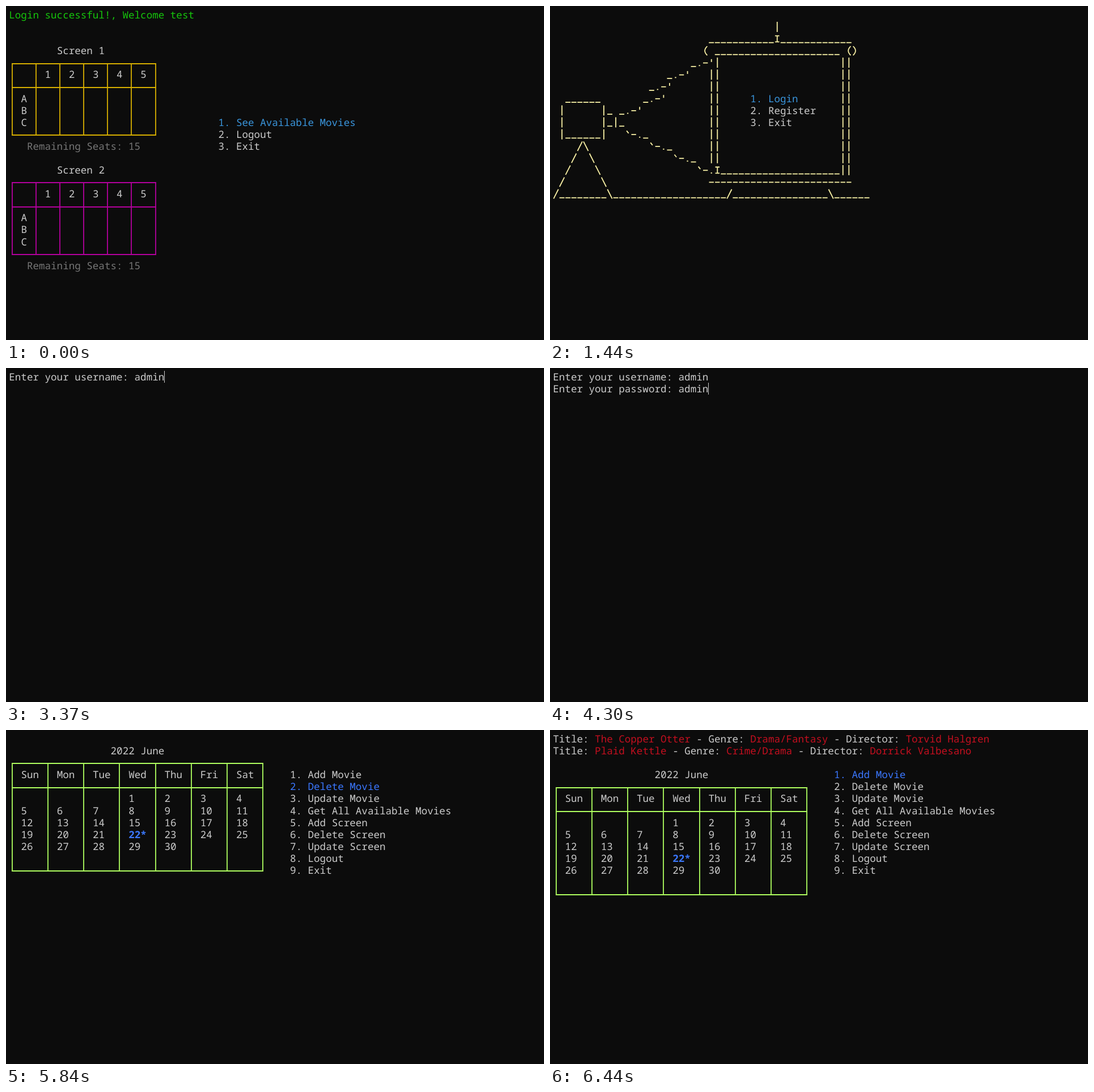
An HTML page for the animation above (8000 ms loop, 949 px wide and 590 px high).

```html
<!DOCTYPE html>
<html lang="en">
<head>
<meta charset="utf-8">
<title>Cinema console</title>
<style>
  html, body { margin: 0; width: 100%; height: 100%; overflow: hidden; background: #0c0c0c; }
  svg { display: block; width: 100%; height: 100%; }
  text {
    font: 17.575px "Noto Sans Mono", "DejaVu Sans Mono", monospace;
    font-variant-ligatures: none;
    text-rendering: geometricPrecision;
    white-space: pre;
  }
  .bold { font-weight: 700; }
  path { fill: none; }
</style>
</head>
<body>
<svg id="stage" viewBox="0 0 949 590" xmlns="http://www.w3.org/2000/svg"></svg>
<script>
const LOOP = 8000;
const CW = 10.545, CH = 21.08, LEFT = 5.3, TOP = 5.3;
const GREY = '#cccccc', DIM = '#767676', GREEN = '#16c60c', RED = '#c50f1f';
const CYAN = '#3a96dd', BLUE = '#3b78ff', CREAM = '#f9f1a5';
const GOLD = '#d7af00', MAGENTA = '#b4009e', LIME = '#afff5f';

const colX = c => LEFT + c * CW;
const midX = c => colX(c) + CW / 2;
const midY = r => TOP + (r + 0.5) * CH;

const text = (c, r, s, color = GREY, cls = '') =>
  `<text x="${colX(c)}" y="${midY(r) + 6.2}" fill="${color}" class="${cls}" xml:space="preserve">${s}</text>`;

const cursor = (c, r) =>
  `<rect x="${Math.round(colX(c))}" y="${Math.round(TOP + r * CH)}" width="1" height="21" fill="${GREY}"/>`;

// Consecutive coloured pieces on one row
function line(r, parts) {
  let c = 0;
  return parts.map(([s, color]) => {
    const out = text(c, r, s, color);
    c += s.length;
    return out;
  }).join('');
}

// Ruled box: n columns of the given width, horizontal rules at the given rows
function grid(rows, n, width, color) {
  const x = i => Math.round(midX(i * width));
  const y = rows.map(r => Math.round(midY(r) + 1.5));
  const top = y[0], bottom = y[y.length - 1];
  let d = y.map(v => `M${x(0) - 1} ${v}H${x(n) + 1}`).join('');
  for (let i = 0; i <= n; i++) d += `M${x(i)} ${top}V${bottom}`;
  return `<path d="${d}" stroke="${color}" stroke-width="1.8"/>`;
}

const menu = (c, r, items, picked, color) =>
  items.map((s, i) => text(c, r + i, `${i + 1}. ${s}`, i + 1 === picked ? color : GREY)).join('');

function hall(no, r, color) {
  let out = text(8, r, `Screen ${no}`) + grid([r + 1, r + 3, r + 7], 6, 4, color);
  for (let i = 1; i <= 5; i++) out += text(2 + 4 * i, r + 2, i);
  [...'ABC'].forEach((s, i) => out += text(2, r + 4 + i, s));
  return out + text(3, r + 8, 'Remaining Seats: 15', DIM);
}

const seats = (r, picked) =>
  hall(1, r, GOLD) + hall(2, r + 10, MAGENTA) +
  menu(35, 9, ['See Available Movies', 'Logout', 'Exit'], picked, CYAN);

function calendar(r) {
  let out = text(17, r, '2022 June') + grid([r + 1, r + 3, r + 10], 7, 6, LIME);
  ['Sun', 'Mon', 'Tue', 'Wed', 'Thu', 'Fri', 'Sat'].forEach((s, i) => out += text(2 + 6 * i, r + 2, s));
  for (let day = 1; day <= 30; day++) {
    const cell = day + 2, c = 2 + 6 * (cell % 7), row = r + 4 + Math.floor(cell / 7);
    out += day === 22 ? text(c, row, '22*', BLUE, 'bold') : text(c, row, day);
  }
  return out;
}

const ADMIN = ['Add Movie', 'Delete Movie', 'Update Movie', 'Get All Available Movies',
  'Add Screen', 'Delete Screen', 'Update Screen', 'Logout', 'Exit'];
const admin = (r, picked) => calendar(r) + menu(47, 3, ADMIN, picked, BLUE);

// Strokes for the line art, relative to the centre of a cell
const STROKES = {
  '_': 'M-4.5 6.7H4.5',
  '-': 'M-4.2 .4H4.2',
  '|': 'M0-9V9',
  '/': 'M-4.2 8.3L4.2-8.3',
  '\\': 'M-4.2-8.3L4.2 8.3',
  '.': 'M-1.2 5.1H1.2',
  "'": 'M0-6.3V-1.2',
  '`': 'M-2-6.3L1.6-1.8',
  '(': 'M3.2-8Q-5.4 0 3.2 8',
  ')': 'M-3.2-8Q5.4 0-3.2 8',
  'I': 'M-3.8-5.4H3.8M0-5.4V5.4M-3.8 5.4H3.8'
};

function art(c, r, s) {
  return [...s].map((ch, i) => STROKES[ch]
    ? `<path d="${STROKES[ch]}" transform="translate(${midX(c + i)} ${midY(r)})"/>` : '').join('');
}

function projector() {
  const u = n => '_'.repeat(n);
  let out = [
    [37, 1, '|'],
    [26, 2, u(11) + 'I' + u(12)],
    [25, 3, '( ' + u(21) + ' ()'],
    [23, 4, "_.-'|"], [19, 5, "_.-'"], [16, 6, "_.-'"],
    [2, 7, u(6)], [15, 7, "_.-'"],
    [1, 8, "|      |_ _.-'"],
    [1, 9, '|      |_|_'],
    [1, 10, '|' + u(6) + '|'], [12, 10, '`-._'],
    [16, 11, '`-._'], [20, 12, '`-._'],
    [24, 13, '`-.I' + u(20)],
    [26, 14, '-'.repeat(24)],
    [0, 15, '/' + u(8) + '\\' + u(19) + '/' + u(16) + '\\' + u(6)]
  ].map(a => art(...a)).join('');
  for (let r = 4; r <= 13; r++) out += art(48, r, '||');
  for (let r = 5; r <= 12; r++) out += art(26, r, '||');
  for (let i = 0; i < 4; i++) out += art(4 - i, 11 + i, '/') + art(5 + i, 11 + i, '\\');
  return `<g stroke="${CREAM}" stroke-width="1.8">${out}</g>` +
    menu(33, 7, ['Login', 'Register', 'Exit'], 1, CYAN);
}

const welcome = name => text(0, 0, `Login successful!, Welcome ${name}`, GREEN);

const NAME = 'admin';
const ask = (what, r, n) => text(0, r, `Enter your ${what}: ` + NAME.slice(0, n));
const askName = n => ask('username', 0, n) + cursor(21 + n, 0);
const askPass = n => ask('username', 0, 5) + ask('password', 1, n) + cursor(21 + n, 1);

const film = (r, title, genre, director) => line(r, [
  ['Title: '], [title, RED], [' - Genre: '], [genre, RED], [' - Director: '], [director, RED]
]);

const steps = [
  [0, welcome('test') + seats(3, 1)],
  [500, seats(2, 2)],
  [1440, projector()],
  ...[2500, 2900, 3000, 3100, 3300, 3370].map((t, i) => [t, askName(i)]),
  ...[3700, 3900, 4000, 4100, 4200, 4300].map((t, i) => [t, askPass(i)]),
  [4700, welcome(NAME) + cursor(0, 1)],
  [4760, welcome(NAME) + admin(2, 1)],
  [5840, admin(1, 2)],
  [5970, admin(1, 3)],
  [6240, admin(1, 4)],
  [6440, film(0, 'The Copper Otter', 'Drama/Fantasy', 'Torvid Halgren') +
    film(1, 'Plaid Kettle', 'Crime/Drama', 'Dorrick Valbesano') + admin(3, 1)]
];

const stage = document.getElementById('stage');
const start = performance.now();
let shown = -1;

function tick() {
  const t = (performance.now() - start) % LOOP;
  let i = steps.length - 1;
  while (steps[i][0] > t) i--;
  if (i !== shown) {
    stage.innerHTML = steps[i][1];
    shown = i;
  }
  requestAnimationFrame(tick);
}
tick();
</script>
</body>
</html>
```
